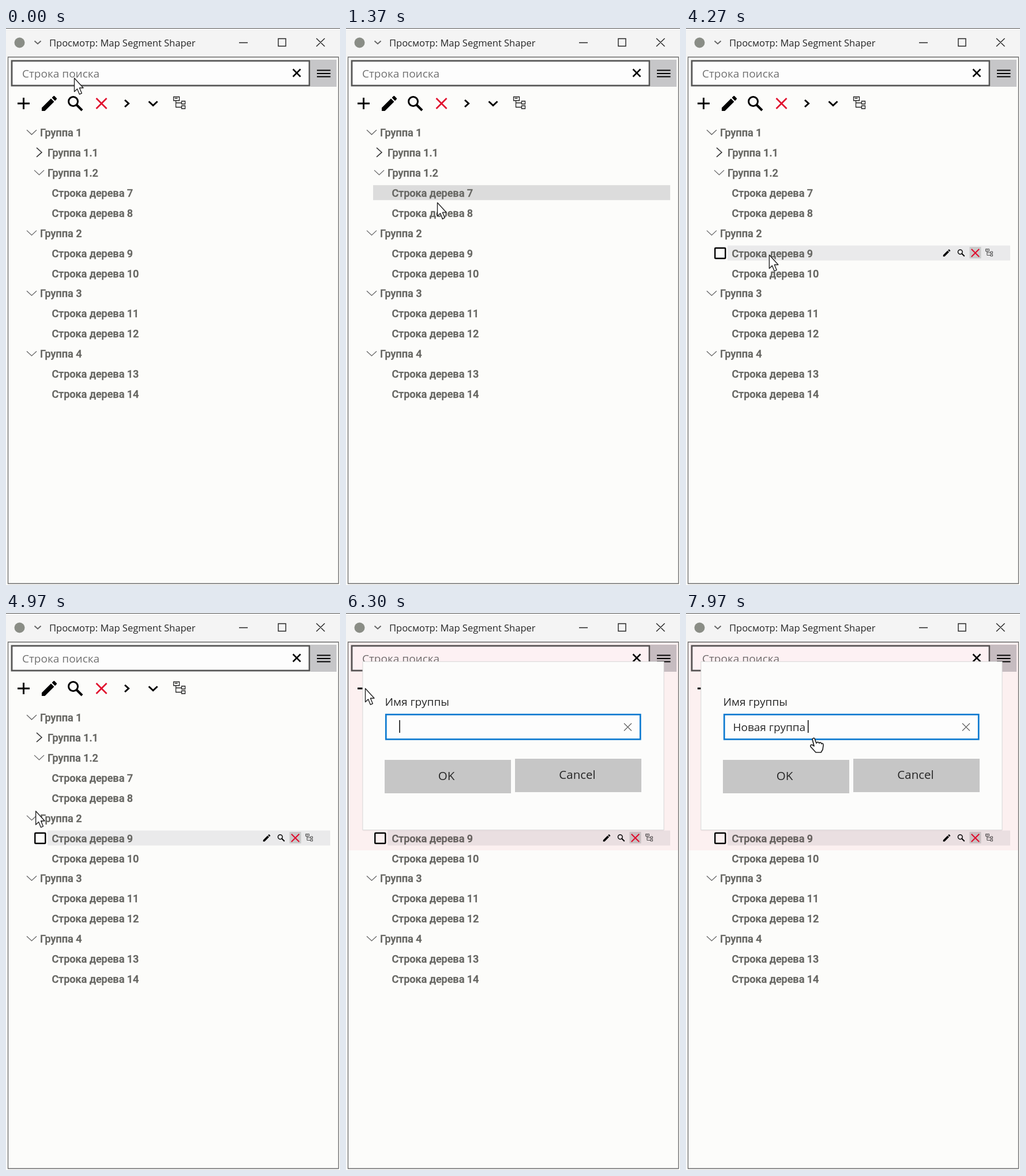
Write an HTML page that moves like this. It is 579x967 px and loops after 8 s.

```html
<!DOCTYPE html>
<html lang="ru">
<head>
<meta charset="utf-8">
<style>
html, body { margin: 0; width: 100%; height: 100%; overflow: hidden; background: #fcfcfa; }
svg { display: block; width: 100vw; height: 100vh; }
text { font-family: "Open Sans", "Noto Sans", sans-serif; fill: #262626; }
.tree text { font: 500 18px Roboto, sans-serif; fill: #656561; stroke: #656561; stroke-width: .45px; }
.line { fill: none; stroke: #000; }
.red { stroke: #e00b2c; }
.shade { mix-blend-mode: multiply; }
</style>
</head>
<body>
<svg viewBox="0 0 579 967">
  <defs>
    <path id="pencil" transform="translate(-17.4 -17.4) scale(1.45)" d="M3 17.25V21h3.75L17.81 9.94l-3.75-3.75zM20.71 7.04a1 1 0 0 0 0-1.41l-2.34-2.34a1 1 0 0 0-1.41 0l-1.83 1.83 3.75 3.75z"/>
    <g id="lens" class="line" stroke-width="3"><circle cx="-3.5" cy="-3.5" r="8"/><path d="M2 2 12 12" stroke-width="4"/></g>
    <path id="cross" class="line red" stroke-width="2.6" d="M-9-9 9 9M9-9-9 9"/>
    <path id="branch" class="line" style="stroke:#222" stroke-width="1.3" d="M-10-10.500H0V-4H-10zM-8-8H-3M-6-4V7.500H4M-6 0H4M4-3H10V2H4zM4 5H10V10H4z"/>
  </defs>

  <rect width="579" height="967" fill="#fcfcfa"/>
  <rect width="579" height="50" fill="#f4f4f4"/>
  <path d="M0 .5H579" class="line" style="stroke:#555"/>
  <path d="M3.5 50.5H576.5V964.5H3.5z" class="line" style="stroke:#666" stroke-width="1.3"/>
  <circle cx="23.5" cy="25.5" r="9" fill="#8a8d86"/>
  <path d="M49.5 22.5l5.5 5 5.5-5" class="line" style="stroke:#666" stroke-width="2"/>
  <text x="75" y="32" font-size="16.5">Просмотр: Map Segment Shaper</text>
  <path d="M404 25.5H419M472 18.5H485V31.5H472zM538 18l14.500 14M552.500 18l-14.500 14" class="line" stroke-width="1.4" style="stroke:#222"/>

  <rect x="10" y="57" width="516" height="43" fill="#fdfdfd" stroke="#555" stroke-width="2.8"/>
  <text x="28" y="85.500" font-size="19" style="fill:#707070">Строка поиска</text>
  <path d="M497.500 71.500l13 13M510.500 71.500l-13 13" class="line" stroke-width="2.6"/>
  <rect x="528" y="55" width="45" height="47" fill="#c6c6c8"/>
  <path d="M539 73.500H562.500M539 79H562.500M539 84.500H562.500" class="line" stroke-width="1.8"/>

  <path d="M20 131H41M30.500 121V141" class="line" stroke-width="3"/>
  <use href="#pencil" x="75" y="131"/>
  <use href="#lens" x="120" y="131"/>
  <use href="#cross" x="165.500" y="131"/>
  <path d="M206 125l6.500 6-6.500 6M247.500 127.500l7.500 7 7.500-7" class="line" stroke-width="3"/>
  <use href="#branch" x="300.500" y="130"/>

  <rect id="highlight" height="26"/>
  <g id="tree" class="tree"></g>
  <g id="rowTools">
    <rect x="50.250" y="382" width="18" height="18" rx="1" class="line" stroke-width="2.4"/>
    <use href="#pencil" transform="translate(452 390.500) scale(.48)"/>
    <use href="#lens" transform="translate(477 390.500) scale(.48)"/>
    <rect x="491.500" y="380" width="20" height="20" fill="#cacaca"/>
    <use href="#cross" transform="translate(501.500 390.500) scale(.75)"/>
    <use href="#branch" transform="translate(525.500 390) scale(.6)"/>
  </g>

  <g id="overlay">
    <rect class="shade" x="4" y="51" width="572" height="361" fill="#fff3f5"/>
    <g id="dialog">
      <rect x="28" y="83.500" width="524" height="295" rx="3" fill="#0000000d"/>
      <rect x="29" y="84.500" width="522" height="292" fill="#fcfcfb" stroke="#ddd"/>
      <text x="67.500" y="161" font-size="19">Имя группы</text>
      <rect x="69.250" y="176.250" width="441" height="43" fill="#fdfdfd" stroke="#0b79d0" stroke-width="2.7"/>
      <text id="entry" x="84.500" y="205" font-size="19"></text>
      <path id="caret" d="M0 186V208" class="line" stroke-width="1.5"/>
      <path d="M482 191.500l13 13M495 191.500l-13 13" class="line" style="stroke:#666" stroke-width="1.3"/>
      <rect x="67" y="255" width="219" height="58" fill="#c6c6c6"/>
      <rect x="293" y="253" width="219" height="58" fill="#c6c6c6"/>
      <g font-size="20.5" text-anchor="middle">
        <text x="174" y="289.500">OK</text>
        <text x="401" y="288">Cancel</text>
      </g>
    </g>
  </g>

  <g id="pointer" fill="#fff" stroke="#222" stroke-width="1.4" stroke-linejoin="round">
    <path id="arrow" d="M.5 0V23.500l5-4.800 3.800 9.300 4-1.700-3.900-9.300H16z"/>
    <path id="hand" stroke-width="1.7" d="M-4 2Q-2-1 0 1L3 9 4 8Q6 6 8 9 10 6 12 10 15 8 15 13L14 20 11 25H2L-7 15Q-8 11-4 12L-1 14z"/>
  </g>
</svg>
<script>
const el = id => document.getElementById(id);
const LOOP = 8000, PITCH = 34.93, FIRST_BASELINE = 188, SELECTED = 6;
const NEW_NAME = "Новая группа";

// Nesting level of a group, or null for a leaf.
const rows = [
  ["Группа 1", 0], ["Группа 1.1", 1], ["Группа 1.2", 1],
  ["Строка дерева 7", null], ["Строка дерева 8", null],
  ["Группа 2", 0], ["Строка дерева 9", null], ["Строка дерева 10", null],
  ["Группа 3", 0], ["Строка дерева 11", null], ["Строка дерева 12", null],
  ["Группа 4", 0], ["Строка дерева 13", null], ["Строка дерева 14", null]
];
const isLeaf = i => rows[i] && rows[i][1] === null;

el("tree").innerHTML = rows.map(([label, level], i) => {
  const y = FIRST_BASELINE + i * PITCH;
  if (isLeaf(i)) return `<text x="79.5" y="${y}">${label}</text>`;
  const x = 36 + level * 13;
  const chevron = label === "Группа 1.1"
    ? `<path class="line" style="stroke:#333" stroke-width="1.5" d="M${x + 4} ${y - 15}l9 8-9 8"/>`
    : `<path class="line" style="stroke:#666" stroke-width="1.3" d="M${x} ${y - 11}l8.500 8 8.500-8"/>`;
  return `${chevron}<text x="${x + 23}" y="${y}">${label}</text>`;
}).join("");

// Pointer path: time, x, y
const path = [
  [0, 118, 87], [470, 118, 87], [1270, 157, 289], [1370, 158, 303],
  [1970, 148, 396], [2200, 148, 396], [2230, 144, 394], [4270, 144, 394],
  [5070, 38, 337], [5430, 33, 131], [7450, 33, 131], [7970, 223, 217], [LOOP, 223, 217]
];

const progress = (t, from, to) => Math.min(1, Math.max(0, (t - from) / (to - from)));

function pointerAt(t) {
  const i = path.findIndex(point => point[0] > t);
  const [t0, x0, y0] = path[i - 1], [t1, x1, y1] = path[i];
  const p = progress(t, t0, t1);
  return [x0 + (x1 - x0) * p, y0 + (y1 - y0) * p];
}

function draw(t) {
  const [x, y] = pointerAt(t);
  el("pointer").setAttribute("transform", `translate(${x} ${y})`);
  const overField = t > 7450 && y > 175;
  el("arrow").style.display = overField ? "none" : "";
  el("hand").style.display = overField ? "" : "none";

  const selection = progress(t, 2800, 3400);
  const active = t >= 2800 ? SELECTED : Math.floor((y - 164.5) / PITCH);
  const left = 47 + 25 * selection;
  const highlight = el("highlight");
  highlight.style.display = isLeaf(active) ? "" : "none";
  highlight.setAttribute("x", left);
  highlight.setAttribute("y", FIRST_BASELINE + active * PITCH - 20);
  highlight.setAttribute("width", 562 - left);
  highlight.setAttribute("fill", active === SELECTED ? "#eaeaeb" : "#dcdcdc");
  el("rowTools").style.opacity = selection;

  const shown = progress(t, 6060, 6200);
  el("overlay").style.display = shown ? "" : "none";
  el("dialog").style.opacity = shown;
  el("dialog").setAttribute("transform", `translate(${t < 6870 ? 0 : -3} 0)`);
  const typed = NEW_NAME.slice(0, Math.floor(progress(t, 6450, 7400) * NEW_NAME.length));
  el("entry").textContent = typed;
  const caretX = typed ? 89 + el("entry").getComputedTextLength() : 93;
  el("caret").setAttribute("transform", `translate(${caretX} 0)`);
}

const start = performance.now();
function tick() {
  draw((performance.now() - start) % LOOP);
  requestAnimationFrame(tick);
}
tick();
</script>
</body>
</html>
```
